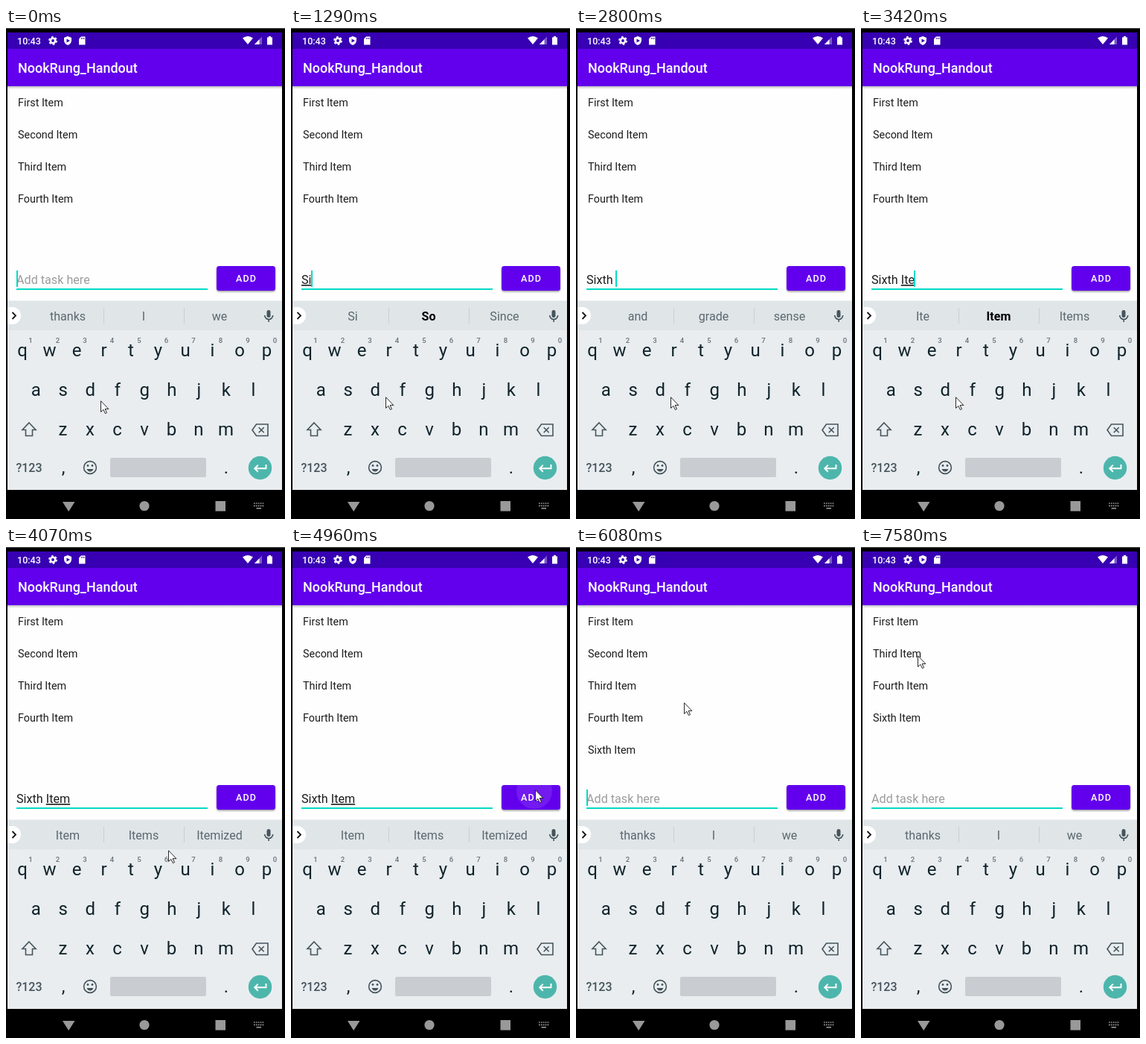
An HTML page for the animation above (8000 ms loop, 375 by 658 pixels).

```html
<!DOCTYPE html>
<html lang="en">
<head>
<meta charset="utf-8">
<title>Task list</title>
<style>
  html, body { margin: 0; width: 100%; height: 100%; overflow: hidden; background: #000; }
  svg { display: block; width: 375px; height: 658px; font-family: Roboto, sans-serif; }
  text { white-space: pre; }
  .mid { text-anchor: middle; }
  .item { font-size: 14.37px; fill: #1c1c1c; }
  .entry { font-size: 16.16px; fill: #1c1c1c; }
  .composing { text-decoration: underline; text-decoration-thickness: 1px; }
  .suggestion { font-size: 16.1px; fill: #5b686f; }
  .suggestion.best { font-weight: 700; fill: #000; }
  .key { font-size: 24px; fill: #10232b; }
  .digit { font-size: 9.6px; font-weight: 500; fill: #66727a; }
  .line { fill: none; stroke: #45545c; stroke-width: 1.6; }
</style>
</head>
<body>
<svg viewBox="0 0 375 658">
  <defs>
    <linearGradient id="shade" x2="0" y2="1">
      <stop stop-color="#000" stop-opacity=".25"/>
      <stop offset="1" stop-color="#000" stop-opacity="0"/>
    </linearGradient>
    <clipPath id="buttonShape"><rect x="283" y="319" width="79" height="33" rx="3.5"/></clipPath>
    <filter id="blur" x="-20%" y="-30%" width="140%" height="170%"><feGaussianBlur stdDeviation="1.3"/></filter>
  </defs>

  <rect width="375" height="658"/>
  <path d="M0 .5H375" stroke="#555"/>
  <rect x="2" y="6" width="369" height="22" fill="#3700b3"/>
  <rect x="2" y="28" width="369" height="50" fill="#6200ee"/>
  <rect x="2" y="78" width="369" height="288" fill="#fefefe"/>
  <rect x="2" y="78" width="369" height="4" fill="url(#shade)"/>

  <!-- Status bar -->
  <text x="15" y="21.5" font-size="12.57" font-weight="500" fill="#fff">10:43</text>
  <g fill="#fff">
    <circle cx="63" cy="17" r="3.2" fill="none" stroke="#fff" stroke-width="2.6"/>
    <circle cx="63" cy="17" r="5.1" fill="none" stroke="#fff" stroke-width="1.6" stroke-dasharray="2.67"/>
    <path d="M83 11L88 13V17Q87.500 21.500 83 23Q78.500 21.500 78 17V13Z"/>
    <path d="M81.500 14.500L86 17L81.500 19.500Z" fill="#3700b3"/>
    <path d="M101 11.500H106.500V22.500H98V14.500Z"/>
    <path d="M101.500 13V15M103.300 13V15M105 13V15" stroke="#3700b3" stroke-width=".8"/>
    <path d="M318 13.500Q325 8.500 332 13.500L325 22Z"/>
    <path d="M344 11.500V22H334Z" opacity=".35"/>
    <path d="M340.500 15.200V22H334Z"/>
    <path d="M351 12.500H353V11H356V12.500H358V22.500H351Z"/>
  </g>
  <text x="16" y="59.700" font-size="17.96" font-weight="500" fill="#fff">NookRung_Handout</text>

  <g id="items"></g>

  <!-- Entry field and button -->
  <text id="hint" class="entry" x="14" y="343" style="fill:#9c9c9c">Add task here</text>
  <text id="entry" class="entry" x="14" y="343"><tspan id="done"></tspan><tspan id="word" class="composing"></tspan></text>
  <rect x="14" y="349" width="257" height="2" fill="#03dac5"/>
  <rect id="caret" y="325" width="2" height="22" fill="#03dac5"/>
  <rect x="283" y="321" width="79" height="32.500" rx="3.5" opacity=".4" filter="url(#blur)"/>
  <rect x="283" y="319" width="79" height="33" rx="3.5" fill="#6200ee"/>
  <g clip-path="url(#buttonShape)"><circle id="ripple" cx="327" cy="327" fill="#fff"/></g>
  <text class="mid" x="323.100" y="340.300" font-size="12.57" font-weight="500" letter-spacing="1.12" fill="#fff">ADD</text>

  <!-- Keyboard -->
  <rect x="2" y="366" width="369" height="253" fill="#e9edf0"/>
  <rect x="2" y="366" width="369" height="39" fill="#e0e5e8"/>
  <path d="M2 365.500H371" stroke="#eceff1"/>
  <path d="M131.500 375V396M239.500 375V396" stroke="#c9cfd3"/>
  <path d="M2 374H8.500A11.500 11.500 0 0 1 8.500 397H2Z" fill="#fff"/>
  <path d="M8.500 381L13 385.500L8.500 390" fill="none" stroke="#111" stroke-width="1.8"/>
  <g id="suggestions"></g>
  <rect x="350.500" y="378" width="5" height="10" rx="2.5" fill="#45545c"/>
  <path class="line" d="M347.700 385A5.500 5.500 0 0 0 358.700 385M353.200 390.500V394"/>
  <g id="keys"></g>
  <path class="line" d="M31 529L40 538.500H35.500V546.500H26.500V538.500H22Z"/>
  <path class="line" d="M336.500 531H352V546.500H336.500L331 538.700ZM339.700 535.200L346.700 542.200M346.700 535.200L339.700 542.200"/>
  <text class="mid" x="31" y="594.800" font-size="16" font-weight="500" fill="#45545c">?123</text>
  <circle class="line" cx="113" cy="589" r="8.400"/>
  <g fill="#45545c"><circle cx="110" cy="586.500" r="1.4"/><circle cx="116" cy="586.500" r="1.4"/></g>
  <path d="M108.500 591H117.500Q116 594.500 113 594.500T108.500 591" fill="#45545c"/>
  <rect x="140" y="576" width="129" height="26" rx="2" fill="#c9cdd1"/>
  <circle cx="341.500" cy="589.500" r="15.700" fill="#4db6ac"/>
  <path d="M349.500 585V590.300H334.500M338.800 585.800L334.200 590.300L338.800 594.800" fill="none" stroke="#fff" stroke-width="1.900"/>

  <!-- Navigation bar -->
  <g fill="#999">
    <path d="M76 635H92.500L84.200 648Z"/>
    <circle cx="186" cy="640.500" r="6.600"/>
    <rect x="281.500" y="634" width="13.500" height="13.500"/>
    <path d="M333 637H346.500M333 640.300H346.500" stroke="#999" stroke-width="1.700" stroke-dasharray="1.7 1.2"/>
    <path d="M336.500 643.700H343" stroke="#999" stroke-width="1.600"/>
  </g>

  <path id="pointer" d="M.5 .8V15.500L3.900 12.400L6.400 17.600L8.500 16.600L6.100 11.600H10.900Z" fill="#fff" stroke="#111" stroke-width=".9"/>
</svg>

<script>
const LOOP = 8000;
const $ = id => document.getElementById(id);

function addText(parent, className, x, y, content = '') {
  const node = document.createElementNS('http://www.w3.org/2000/svg', 'text');
  node.setAttribute('class', className);
  node.setAttribute('x', x);
  node.setAttribute('y', y);
  node.textContent = content;
  parent.append(node);
  return node;
}

function addKeys(letters, x, y) {
  [...letters].forEach((letter, i) => addText($('keys'), 'mid key', x + i * 36.5, y, letter));
}
addKeys('qwertyuiop', 22, 439.5);
addKeys('asdfghjkl', 40.3, 492.5);
addKeys('zxcvbnm', 76.5, 545.5);
addKeys(',', 77, 597);
addKeys('.', 296, 597);
[...'1234567890'].forEach((digit, i) => addText($('keys'), 'mid digit', 33 + i * 36.5, 421.5, digit));

const rows = [0, 1, 2, 3, 4].map(i => addText($('items'), 'item', 16, 105 + i * 43));
const chips = [83, 185, 287].map(x => addText($('suggestions'), 'mid suggestion', x, 392));

const idle = 'thanks I we';
const startItems = ['First', 'Second', 'Third', 'Fourth'];
const initial = {
  items: startItems, done: '', word: '', caret: true,
  suggestions: idle, best: false, pointer: [127, 499], ripple: [0, 0]
};

const at = (time, change) => ({ time, change });
const type = (time, word, suggestions, best = false) =>
  at(time, { word, suggestions, best, caret: true });
const blink = (time, caret) => at(time, { caret });
const move = (time, x, y) => at(time, { pointer: [x, y] });

// Each step replaces part of the state from its time on.
const steps = [
  move(130, 127, 494),
  blink(510, false),
  type(1040, 'S', 'S So She', true),
  type(1290, 'Si', 'Si So Since', true),
  blink(1790, false),
  type(1910, 'Six', 'Six Sixth Sixes'),
  type(2050, 'Sixt', 'Six Sixth Sixes'),
  type(2170, 'Sixt', 'Sixt Sixth Sixty', true),
  type(2550, 'Sixth', 'Sixth Sixths Sixty'),
  at(2800, { done: 'Sixth ', word: '', suggestions: 'and grade sense' }),
  type(3180, 'I', "I I'm In"),
  type(3300, 'It', "It It's Its"),
  type(3420, 'Ite', 'Ite Item Items', true),
  type(3540, 'Item', 'Item Items Itemized'),
  blink(4070, false),
  move(4070, 218, 406),
  move(4190, 286, 350),
  move(4310, 332, 318),
  move(4430, 346, 311),
  move(4570, 341, 316),
  move(4690, 333, 322),
  move(4820, 328, 325),
  at(4960, { ripple: [24, 0.1] }),
  at(5080, {
    items: [...startItems, 'Sixth'], done: '', word: '',
    suggestions: idle, caret: true, ripple: [42, 0.14]
  }),
  at(5200, { ripple: [60, 0.08] }),
  at(5320, { ripple: [0, 0] }),
  blink(5560, false),
  move(5840, 312, 314),
  move(5960, 228, 264),
  blink(6080, true),
  move(6080, 145, 208),
  move(6200, 102, 168),
  move(6320, 82, 150),
  move(6440, 76, 146),
  blink(6580, false),
  move(6580, 76, 145),
  blink(7080, true),
  at(7330, { items: ['First', 'Third', 'Fourth', 'Sixth'] }),
  blink(7580, false)
];

function draw(time) {
  const state = Object.assign({}, initial,
    ...steps.filter(step => step.time <= time).map(step => step.change));

  rows.forEach((row, i) => {
    row.textContent = state.items[i] ? state.items[i] + ' Item' : '';
  });
  const words = state.suggestions.split(' ');
  chips.forEach((chip, i) => {
    chip.textContent = words[i];
    chip.classList.toggle('best', state.best && i === 1);
  });

  $('done').textContent = state.done;
  $('word').textContent = state.word;
  const empty = !state.done && !state.word;
  $('hint').style.display = empty ? '' : 'none';
  const width = empty ? 0 : $('entry').getComputedTextLength();
  $('caret').setAttribute('x', Math.max(14, Math.floor(13.5 + width)));
  $('caret').style.display = state.caret ? '' : 'none';

  const [radius, opacity] = state.ripple;
  $('ripple').setAttribute('r', radius);
  $('ripple').setAttribute('opacity', opacity);
  $('pointer').setAttribute('transform', `translate(${state.pointer})`);
}

function tick() {
  draw(performance.now() % LOOP);
  requestAnimationFrame(tick);
}
tick();
</script>
</body>
</html>
```
